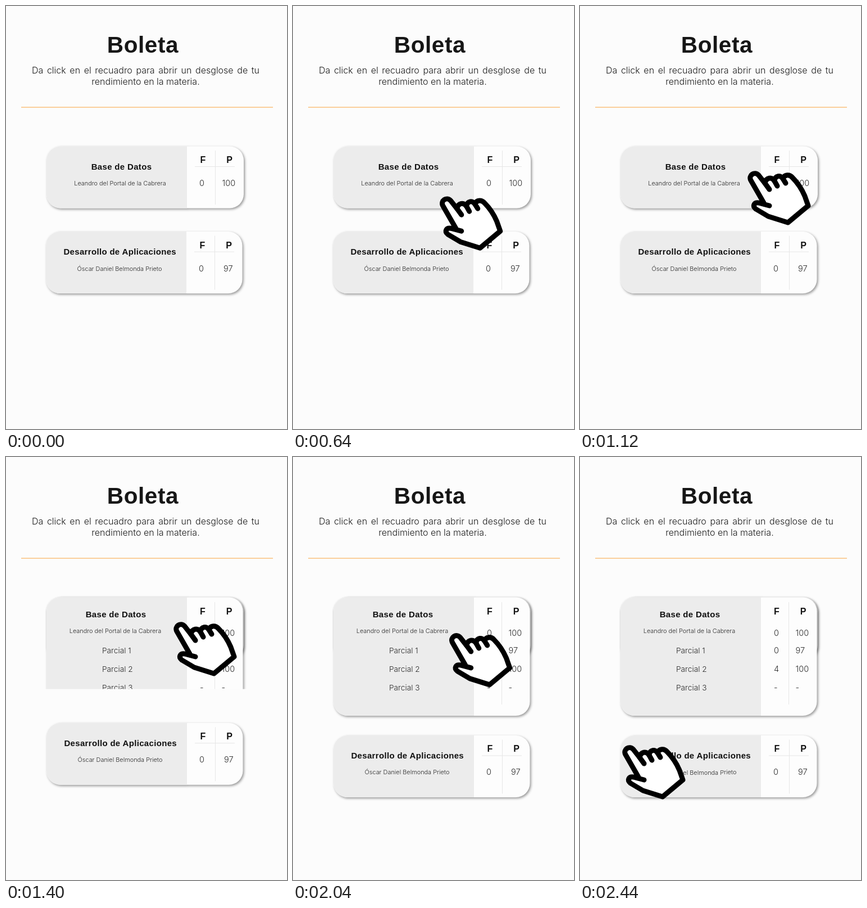
Write an HTML page that moves like this. It is 500 by 752 pixels and loops after 3000 ms.

```html
<!DOCTYPE html>
<html lang="es">
<head>
<meta charset="utf-8">
<title>Boleta</title>
<style>
  html, body { margin: 0; width: 100%; height: 100%; overflow: hidden; background: #fcfcfc; }
  svg { position: absolute; left: 0; top: 0; }
  p {
    position: absolute; left: 46px; top: 103.5px; width: 405px; margin: 0;
    font: 300 16px/20.5px Inter, sans-serif; color: #1c1c1c;
    text-align: justify; text-align-last: center;
  }
  p span { display: block; text-align-last: justify; }
  text { font-family: Inter, sans-serif; font-weight: 300; fill: #2a2a2a; }
  .bold { font-family: "Liberation Sans", Arial, sans-serif; font-weight: 700; fill: #111; }
  .mid { text-anchor: middle; }
  .h1 { font-size: 40.5px; letter-spacing: .6px; fill: #161616; }
  .title { font-size: 15px; letter-spacing: .33px; }
  .name { font-size: 10.9px; }
  .head { font-size: 16px; }
  .num { font-size: 14.5px; }
  .row { font-size: 13.7px; }
  .box { filter: drop-shadow(2px 2px 2px rgba(0, 0, 0, .4)); }
  .rule { stroke: #e6e6e6; fill: none; }
</style>
</head>
<body>
<svg width="500" height="752" viewBox="0 0 500 752">
  <clipPath id="wipe"><rect id="wipeRect" x="60" y="240" width="380"/></clipPath>
  <text class="bold mid h1" x="243.5" y="83">Boleta</text>
  <rect x="27" y="179.2" width="448" height="1.7" fill="#fbc88c"/>
  <g id="first"></g>
  <g id="open" clip-path="url(#wipe)"></g>
  <g id="second"></g>
  <g id="hand" stroke="#000" stroke-width="9" stroke-linecap="round" stroke-linejoin="round" fill="none">
    <path fill="#fff" d="M327 350L304 310C299 301 311 293 318 301L329 315C331 305 341 303 346 311C347 301 357 300 361 307C364 299 373 299 378 305C392 319 397 331 400 338L406 355L370 385L335 374L313 361C306 355 310 349 318 350L337 355"/>
    <path d="M329 315L337 326M346 311L351 320M361 307L366 315"/>
  </g>
</svg>
<p><span>Da click en el recuadro para abrir un desglose de tu</span>rendimiento en la materia.</p>
<script>
const $ = id => document.getElementById(id);
const text = (cls, x, y, s) => `<text class="${cls}" x="${x}" y="${y}">${s}</text>`;

// Rounded card at 72,249.5 with a grey left part
const box = (w, h) => `<g class="box">
  <rect x="72" y="249.5" width="${w}" height="${h}" rx="25" fill="#fdfdfd"/>
  <path d="M322 249.5H97a25 25 0 0 0-25 25v${h - 50}a25 25 0 0 0 25 25H322z" fill="#ececec"/></g>`;

const card = (w, title, titleX, name, nameX, grade) => box(w, 110) +
  '<path class="rule" d="M336 285.5H407M372.5 257V353"/>' +
  text('bold mid title', titleX, 290.5, title) +
  text('mid name', nameX, 319, name) +
  text('bold mid head', 350.5, 279, 'F') +
  text('bold mid head', 397.7, 279, 'P') +
  text('mid num', 348.5, 320, 0) +
  text('mid num', 396.3, 320, grade);

const teacher = 'Leandro del Portal de la Cabrera';
$('first').innerHTML = card(351, 'Base de Datos', 205.5, teacher, 203, 100);
$('second').innerHTML =
  card(349.5, 'Desarrollo de Aplicaciones', 203.7, 'Óscar Daniel Belmonda Prieto', 203, 97);

const rows = [['', 0, 100, 318], ['Parcial 1', 0, 97, 348.5], ['Parcial 2', 4, 100, 381.5], ['Parcial 3', '-', '-', 414.5]];
$('open').innerHTML = box(349.5, 210.5) +
  '<path class="rule" d="M371.5 258V440"/>' +
  text('bold mid title', 195.5, 284.5, 'Base de Datos') +
  text('mid name', 194.5, 312.5, teacher) +
  text('bold mid head', 350, 280, 'F') +
  text('bold mid head', 397, 280, 'P') +
  rows.map(([label, f, p, y]) =>
    text('row', 171, y, label) + text('num', 345, y, f) + text('num', 383.5, y, p)).join('');

const part = (t, from, to) => Math.min(1, Math.max(0, (t - from) / (to - from)));
const easeOut = u => 1 - (1 - u) ** 1.6;
const easeInOut = u => u < .5 ? 8 * u ** 4 : 1 - 8 * (1 - u) ** 4;
const move = (id, x, y) => $(id).setAttribute('transform', `translate(${x} ${y})`);

function draw(t) {
  const enter = 1 - easeOut(part(t, 320, 800));
  const leave = part(t, 2000, 2440);
  $('hand').style.display = t < 320 ? 'none' : '';
  move('hand', -216 * enter - 223 * leave, 262 * enter + 219 * leave);

  // A small lift on press, then the card gives way to the open one
  const lift = t < 920 ? 0 : 2 * (1 - part(t, 920, 1120));
  move('second', t < 960 ? -1 : 0, 151.5 - lift + 94 * easeInOut(part(t, 1160, 1570)));

  $('wipeRect').setAttribute('height', 230 * part(t, 1200, 1470.6) + (t > 1200 ? 9 * (1 - part(t, 1200, 1480)) : 0));
}

const start = performance.now();
function tick() {
  const t = (performance.now() - start) % 3000;
  draw(Math.floor(t / 40) * 40);
  requestAnimationFrame(tick);
}
tick();
</script>
</body>
</html>
```
